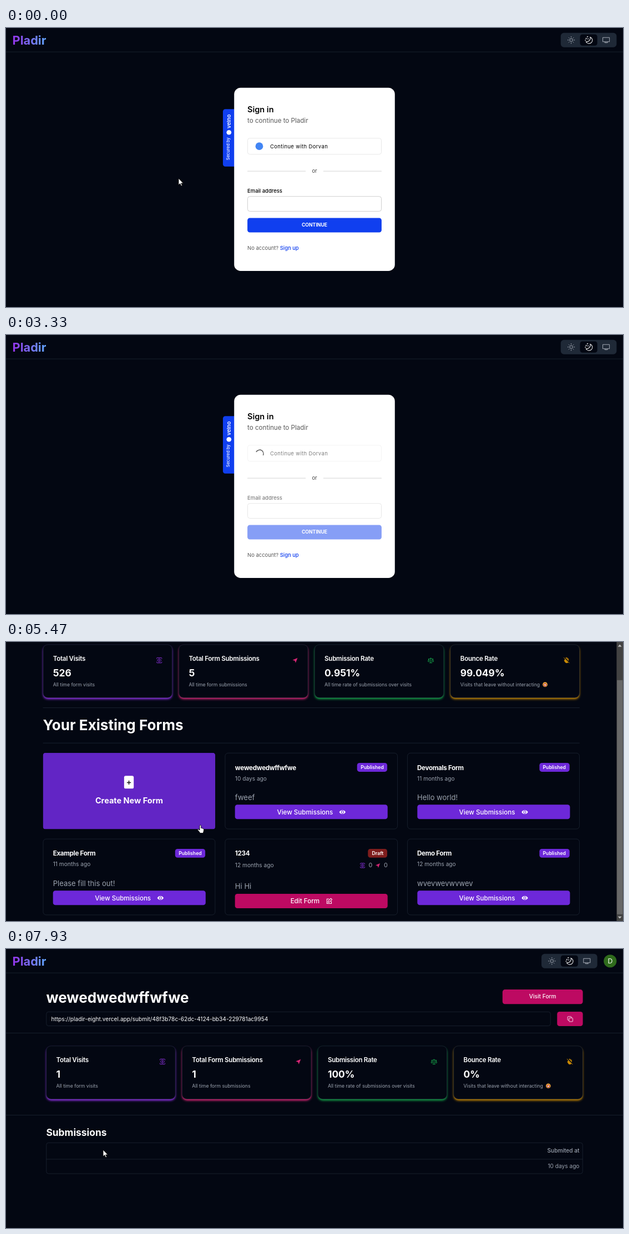
An HTML page for the animation above (8000 ms loop, 1112 by 503 pixels).

```html
<!DOCTYPE html>
<html lang="en">
<head>
<meta charset="utf-8">
<title>Form dashboard</title>
<style>
html, body { margin: 0; width: 100%; height: 100%; overflow: hidden; background: #030712; }
body { position: relative; font-family: Inter, "Open Sans", sans-serif; color: #fff; }
#stage { position: absolute; left: 0; top: 0; width: 1536px; height: 695px; overflow: hidden;
  transform: scale(.72396); transform-origin: 0 0; }
.page, .page > div.scroll { position: absolute; inset: 0; }
.box, .text, .icon { position: absolute; box-sizing: border-box; }
.text { white-space: nowrap; line-height: 1.2; }
.line { border: 1px solid #1f2937; }
.muted { color: #9ca3af; }
.logo { background: linear-gradient(90deg, #9333ea, #60a5fa); -webkit-background-clip: text;
  background-clip: text; color: transparent; }
.loading .fade { opacity: .5; }
.spin { border-radius: 50%; border: 2px solid; border-color: #555 #555 transparent transparent; display: none; }
.loading .spin { display: block; }
.loading .mark { display: none; }
#cursor { position: absolute; left: 0; top: 0; width: 24px; height: 24px; overflow: visible;
  fill: #fff; stroke: #000; stroke-width: .8; stroke-linejoin: round; }
</style>
</head>
<body>
<div id="stage"></div>
<svg id="cursor">
  <path id="arrow" d="M0 0V12L2.8 9.5L4.7 13.8L6.6 13L4.7 8.9H8.5Z"/>
  <path id="hand" d="M-1.3 1.2a1.3 1.3 0 0 1 2.6 0V5l3.4.8q1.7.5 1.6 2l-.5 3.4-.9 3h-5.6l-.9-2-3.2-3.6q-.6-1.5 1.2-1.4l2.3 1.6z"/>
</svg>
<script>
const $ = id => document.getElementById(id);
const VIOLET = '#6d28d9', VIOLET_HOVER = '#6225c5', PINK = '#bd0a62', BLUE = '#103fef', DARK = '#030712';

// ---- building blocks: y is always the middle of a text line ----
const box = (x, y, w, h, css = '', inner = '', attrs = '') =>
  `<div ${attrs.includes('class=') ? attrs : 'class="box" ' + attrs} style="left:${x}px;top:${y}px;width:${w}px;height:${h}px;${css}">${inner}</div>`;
const framed = (x, y, w, h, radius, inner = '') =>
  box(x, y, w, h, `border-radius:${radius}px`, inner, 'class="box line"');
const rule = (x, y, w, color = '#1f2937') => box(x, y, w, 1, `background:${color}`);
const text = (x, y, size, str, css = '', align = 0, cls = '') =>
  `<div class="text ${cls}" style="left:${x}px;top:${y}px;font-size:${size}px;translate:${-align * 100}% -50%;${css}">${str}</div>`;
const BOLD = 'font-weight:700;', SEMI = 'font-weight:600;', MEDIUM = 'font-weight:500;', TIGHT = 'letter-spacing:-.025em;';

const ICONS = {
  view: '<path d="M5 12s2.5-5 7-5 7 5 7 5-2.5 5-7 5-7-5-7-5zM21 17v2a2 2 0 0 1-2 2H5a2 2 0 0 1-2-2v-2M21 7V5a2 2 0 0 0-2-2H5a2 2 0 0 0-2 2v2"/><circle cx="12" cy="12" r="1.5"/>',
  plane: '<path d="M20.500 4L14 20.500L11.500 13.500L4 11Z" fill="currentColor" stroke-width=".5"/>',
  scale: '<path d="M16 16l3-8 3 8c-2 1.300-4 1.300-6 0zM2 16l3-8 3 8c-2 1.300-4 1.300-6 0zM7 21h10M12 3v18M3 7h2c2 0 5-1 7-2 2 1 5 2 7 2h2"/>',
  handOff: '<path d="M7 11V5m3.500 5V3m3.500 7V4m3.500 7V6.500" stroke-width="3" stroke-linecap="round"/><path d="M5.500 10h13.500v6q-1 6-7 6-4 0-6-4l-3-5z" fill="currentColor" stroke="none"/><path d="M4 2L23 21" stroke="#030712" stroke-width="4"/><path d="M2 2L22 22"/>',
  sun: '<circle cx="12" cy="12" r="4.500"/><path d="M12 1v3.500M12 19.500V23M1 12h3.500M19.500 12H23M4.500 4.500l2 2M17.500 17.500l2 2M4.500 19.500l2-2M17.500 6.500l2-2"/>',
  moon: '<path d="M16 3.200A10 10 0 1 1 3.500 17A11 11 0 0 0 16 3.200Z"/><path d="M8 0v4M6 2h4M4 5.500v4M2 7.500h4M9.500 7v3M8 8.500h3M1.500 11v3M0 12.500h3" stroke-width="1.400"/>',
  display: '<path d="M2 4.500h20v12.500h-20zM9 17l-1 3h8l-1-3"/>',
  eye: '<path d="M1 12C5 3 19 3 23 12C19 21 5 21 1 12Z" fill="currentColor" stroke="none"/><circle cx="12" cy="12" r="4" stroke="#6d28d9"/>',
  edit: '<path d="M12 4H4v16h16v-8M8 16l1-5 9-9 4 4-9 9z"/>',
  copy: '<rect x="8" y="8" width="13" height="13" rx="2"/><path d="M16 8V5a2 2 0 0 0-2-2H5a2 2 0 0 0-2 2v9a2 2 0 0 0 2 2h3"/>',
};
const icon = (x, y, size, name, color = '#fff', weight = 2) =>
  `<svg class="icon" viewBox="0 0 24 24" style="left:${x - size / 2}px;top:${y - size / 2}px;width:${size}px;height:${size}px;color:${color}" fill="none" stroke="currentColor" stroke-width="${weight}">${ICONS[name]}</svg>`;

function header(width, height, user) {
  const y = height / 2, x = width - 155 - (user ? 48 : 0);
  return text(16, y, 30, 'Pladir', BOLD, 0, 'logo') +
    box(x, y - 18, 139, 36, 'background:#1f2937;border-radius:8px') +
    box(x + 48, y - 14, 43, 28, `background:${DARK};border-radius:6px`) +
    icon(x + 26, y, 20, 'sun', '#b4bac4', 1.5) + icon(x + 69.500, y, 20, 'moon', '#fff', 1.7) +
    icon(x + 113, y, 20, 'display', '#b4bac4', 1.5) +
    (user ? box(width - 48, y - 16, 32, 32, 'background:#2f6b1c;border-radius:50%') +
      text(width - 32, y, 17, 'D', '', .5) : '') +
    rule(0, height - 1, width);
}

const STATS = [
  ['Total Visits', 'All time form visits', '#9333ea', 'view'],
  ['Total Form Submissions', 'All time form submissions', '#db2777', 'plane'],
  ['Submission Rate', 'All time rate of submissions over visits', '#16a34a', 'scale'],
  ['Bounce Rate', 'Visits that leave without interacting', '#ca8a04', 'handOff'],
];
const face = '<span style="display:inline-block;width:12px;height:12px;margin-left:7px;vertical-align:-2px;border-radius:50%;background:radial-gradient(circle at 50% 58%,#f5d0c5 0 22%,#b4403a 24% 40%,#e9a23b 44%)"></span>';

const stats = (left, top, values) => STATS.map(([title, note, color, glyph], i) =>
  box(left + i * 338, top, 322, 133,
    `border-radius:12px;background:${DARK};box-shadow:0 4px 6px -1px ${color},0 2px 4px -2px ${color}`,
    text(24, 35, 16, title, SEMI + TIGHT) + text(24, 71, 24, values[i], BOLD) +
    text(24, 98.5, 12, note + (i === 3 ? face : ''), '', 0, 'muted') +
    icon(288, 38, 17, glyph, color, 1.8), 'class="box line"')).join('');

const button = (x, y, w, label, glyph, color, id = '') =>
  box(x, y, w, 36, `background:${color};border-radius:6px;display:flex;align-items:center;justify-content:center;gap:16px;font:500 16px Inter,sans-serif`,
    `<span>${label}</span><span style="width:16px;height:16px;position:relative">${icon(8, 8, 17, glyph)}</span>`, id && `id="${id}"`);

function formCard(x, y, { name, age, note, draft, id }) {
  const badge = draft ? 48 : 75;
  return framed(x, y, 429.3, 190, 8,
    text(24, 35.5, 16, name, BOLD + TIGHT) +
    box(403 - badge, 24, badge, 22, `background:${draft ? '#7f1d1d' : VIOLET};border-radius:6px`,
      text(badge / 2, 11, 12, draft ? 'Draft' : 'Published', SEMI, .5)) +
    text(24, draft ? 65 : 62.5, 14, age, '', 0, 'muted') +
    (draft ? icon(341, 65, 15, 'view', '#9333ea') + text(361, 65, 15, '0', '', .5, 'muted') +
      icon(379, 65, 15, 'plane', '#db2777') + text(399, 65, 15, '0', '', .5, 'muted') : '') +
    text(24, draft ? 117 : 111, 18, note, '', 0, 'muted') +
    (draft ? button(24, 136, 380, 'Edit Form', 'edit', PINK)
      : button(24, 128, 380, 'View Submissions', 'eye', VIOLET, id)));
}

// ---- pages ----
function signIn() {
  const faded = (html) => `<div class="fade">${html}</div>`;
  const side = box(540, 202, 30, 143, `background:${BLUE};border-radius:6px 0 0 6px`,
    `<div style="position:absolute;left:0;top:143px;width:143px;height:28px;transform:rotate(-90deg);transform-origin:0 0">` +
    text(16, 14, 10.4, 'Secured by', MEDIUM) +
    box(79, 9, 12, 12, 'background:#fff;border-radius:50%') + text(95, 15, 13.2, 'velno', SEMI) + '</div>');
  return header(1536, 60, false) + side +
    box(568, 149, 400, 456, 'background:#fff;border-radius:16px') +
    text(601, 203, 20, 'Sign in', SEMI + 'color:#000') +
    text(601, 231, 16, 'to continue to Pladir', 'color:#595959') +
    faded(box(601, 273.5, 334, 41.500, 'border:1px solid #e0e0e0;border-radius:6px', '', 'id="oauth"') +
      box(621, 284.5, 19, 19, 'background:#4285f4;border-radius:50%', '', 'class="box mark"') +
      text(657.5, 294.5, 13, 'Continue with Dorvan', 'letter-spacing:.55px;color:#000')) +
    box(621, 284.500, 21, 21, '', '', 'class="box spin" id="spin"') +
    rule(601, 356, 145, '#c4c4c4') + rule(790, 356, 145, '#c4c4c4') +
    text(768, 356, 13, 'or', 'color:#444', .5) +
    faded(text(601, 406, 13, 'Email address', MEDIUM + 'color:#000') +
      box(601, 419, 334, 38, 'border:1px solid #bdbdbd;border-radius:6px') +
      box(601, 472.5, 334, 36, `background:${BLUE};border-radius:6px`,
        text(167, 18, 12, 'CONTINUE', BOLD, .5), 'id="submit"')) +
    text(601, 548.5, 13, 'No account?', 'color:#595959') +
    text(682, 548.5, 13, 'Sign up', MEDIUM + `color:${BLUE}`);
}

function dashboard() {
  const left = 92, col = i => left + i * 453.3;
  const forms = [
    { name: 'wewedwedwffwfwe', age: '10 days ago', note: 'fweef', id: 'viewForm' },
    { name: 'Devomals Form', age: '11 months ago', note: 'Hello world!' },
    { name: 'Example Form', age: '11 months ago', note: 'Please fill this out!' },
    { name: '1234', age: '12 months ago', note: 'Hi Hi', draft: true },
    { name: 'Demo Form', age: '12 months ago', note: 'wvevwevwvwev' },
  ];
  const create = box(left, 370, 429.3, 190, 'border:1px dashed #0d1220;border-radius:6px',
    box(201, 56, 24, 32, 'background:#fff;border-radius:4px', box(7, 15.500, 10, 2, 'background:#111') + box(11, 11.500, 2, 10, 'background:#111')) +
    text(213.500, 118, 20, 'Create New Form', BOLD, .5), 'id="create"');
  const arrow = (y, pts) => `<svg class="icon" style="left:3px;top:${y}px;width:10px;height:6px" viewBox="0 0 10 6"><path d="${pts}" fill="#bbb"/></svg>`;
  return '<div class="scroll" id="scroll">' + header(1520, 52.5, true) +
    stats(left, 100, ['526', '5', '0.951%', '99.049%']) +
    rule(left, 256.500, 1336) + text(left, 301, 36, 'Your Existing Forms', BOLD) + rule(left, 345, 1336) + create +
    forms.map((f, i) => formCard(col((i + 1) % 3), i < 2 ? 370 : 584, f)).join('') + '</div>' +
    box(1520, 0, 16, 695, 'background:#424242',
      arrow(6, 'M0 6L5 0L10 6Z') + arrow(683, 'M0 0L5 6L10 0Z') +
      box(1, 15, 14, 583, 'background:#686868', '', 'id="thumb"'));
}

// Ring that tapers backwards from a round head at angle zero.
const RING = 22.6, RING_WIDTH = 4.8;
function ringPath() {
  const steps = 44, outer = [], inner = [];
  const point = (r, a) => `${r * Math.cos(a)} ${r * Math.sin(a)}`;
  for (let i = 0; i <= steps; i++) {
    const p = i / steps, a = -p * 5.75;
    outer.push(point(RING, a));
    inner.unshift(point(RING - RING_WIDTH * (1 - p ** 1.6), a));
  }
  return 'M' + outer.concat(inner).join('L') + 'Z';
}

const waiting = () => header(1536, 60, true) +
  `<svg class="icon" style="left:744px;top:354px;width:48px;height:48px" viewBox="-24 -24 48 48"><g id="ring" fill="#fff"><path d="${ringPath()}"/><circle cx="${RING - RING_WIDTH / 2}" r="${RING_WIDTH / 2}"/></g></svg>`;

const detail = () => header(1536, 60, true) +
  text(100, 120.5, 36, 'wewedwedwffwfwe', BOLD) +
  box(1236, 101, 200, 36, `background:${PINK};border-radius:6px`, text(100, 18, 14, 'Visit Form', MEDIUM, .5)) +
  framed(100, 156, 1256, 36, 6) +
  text(112.5, 174.5, 14, 'https://pladir-eight.vercel.app/submit/48f3b78c-62dc-4124-bb34-229781ac9954') +
  box(1372, 156, 64, 36, `background:${PINK};border-radius:6px`, icon(32, 18, 17, 'copy', '#fff', 1.6)) +
  rule(0, 209, 1536) + stats(100, 241, ['1', '1', '100%', '0%']) + rule(0, 413, 1536) +
  text(100, 458, 24, 'Submissions', BOLD) +
  framed(100, 482, 1336, 78, 6) + rule(100, 522.500, 1336) +
  text(1427.500, 503, 14, 'Submited at', MEDIUM, 1, 'muted') +
  text(1427.500, 541, 14, '10 days ago', '', 1, 'muted');

const PAGES = [['signIn', signIn, 0], ['dashboard', dashboard, 63], ['waiting', waiting, 104], ['detail', detail, 113]];
$('stage').innerHTML = PAGES.map(([id, make]) => `<div class="page" id="${id}">${make()}</div>`).join('');

// ---- motion, in ticks of 1/15 s; pointer and scroll in stage pixels ----
const POINTER = [
  [8, 311, 271], [13, 385, 325], [17, 480, 361], [21, 530, 350], [26, 529, 217], [31, 529, 217],
  [34, 528, 227], [39, 500, 285], [44, 440, 358], [50, 76, 504], [63, 90, 506], [67, 150, 420],
  [71, 310, 365], [73, 380, 351], [76, 391, 351], [80, 391, 351], [83, 330, 320], [87, 560, 371],
  [89, 708, 345], [91, 586, 307], [94, 586, 307], [100, -10, 505], [112, -10, 505], [113, 60, 485], [119, 175, 362],
];
const SCROLL = [[69, 0], [70, 6], [71, 18], [72, 37], [73, 55], [74, 64], [75, 68]];

function at(track, tick) {
  const next = track.findIndex(k => k[0] > tick);
  if (next === 0) return track[0].slice(1);
  if (next < 0) return track[track.length - 1].slice(1);
  const a = track[next - 1], b = track[next], p = (tick - a[0]) / (b[0] - a[0]);
  return a.slice(1).map((v, i) => v + (b[i + 1] - v) * p);
}

function render(tick) {
  const during = (from, to) => tick >= from && tick < to;
  PAGES.forEach(([id, , start], i) => {
    const end = PAGES[i + 1] ? PAGES[i + 1][2] : 120;
    $(id).style.display = during(start, end) ? 'block' : 'none';
  });

  const onSubmit = during(16, 23), onOauth = during(25, 32), onView = during(90, 96);
  $('signIn').classList.toggle('loading', during(32, 63));
  $('submit').style.background = onSubmit ? '#0d35cc' : BLUE;
  $('oauth').style.background = onOauth ? '#f5f5f5' : '#fff';
  $('spin').style.transform = `rotate(${100 + (Math.min(tick, 50) - 34) * 60}deg)`;

  const [scroll] = at(SCROLL, tick);
  $('scroll').style.transform = `translateY(${-scroll / .72396}px)`;
  $('thumb').style.top = 15 + scroll * 1.18 + 'px';
  const onCreate = during(68, 76) || during(81, 84);
  $('create').style.background = onCreate ? VIOLET_HOVER : 'none';
  $('create').style.borderColor = onCreate ? VIOLET_HOVER : '#0d1220';
  $('viewForm').style.background = onView ? VIOLET_HOVER : VIOLET;
  $('ring').setAttribute('transform', `rotate(${109 + (Math.min(tick, 110) - 109) * 24})`);

  const [x, y] = at(POINTER, tick);
  const pointing = onSubmit || onOauth || onView || during(68, 73) || during(81, 84);
  $('cursor').style.transform = `translate(${x}px,${y}px)`;
  $('cursor').style.visibility = x < -5 || y > 503 ? 'hidden' : 'visible';
  $('arrow').style.display = pointing ? 'none' : '';
  $('hand').style.display = pointing ? '' : 'none';
}

const begin = performance.now();
function loop() {
  const ms = Math.max(0, performance.now() - begin) % 8000;
  render(Math.floor((ms + 4) * .015) % 120);
  requestAnimationFrame(loop);
}
loop();
</script>
</body>
</html>
```
